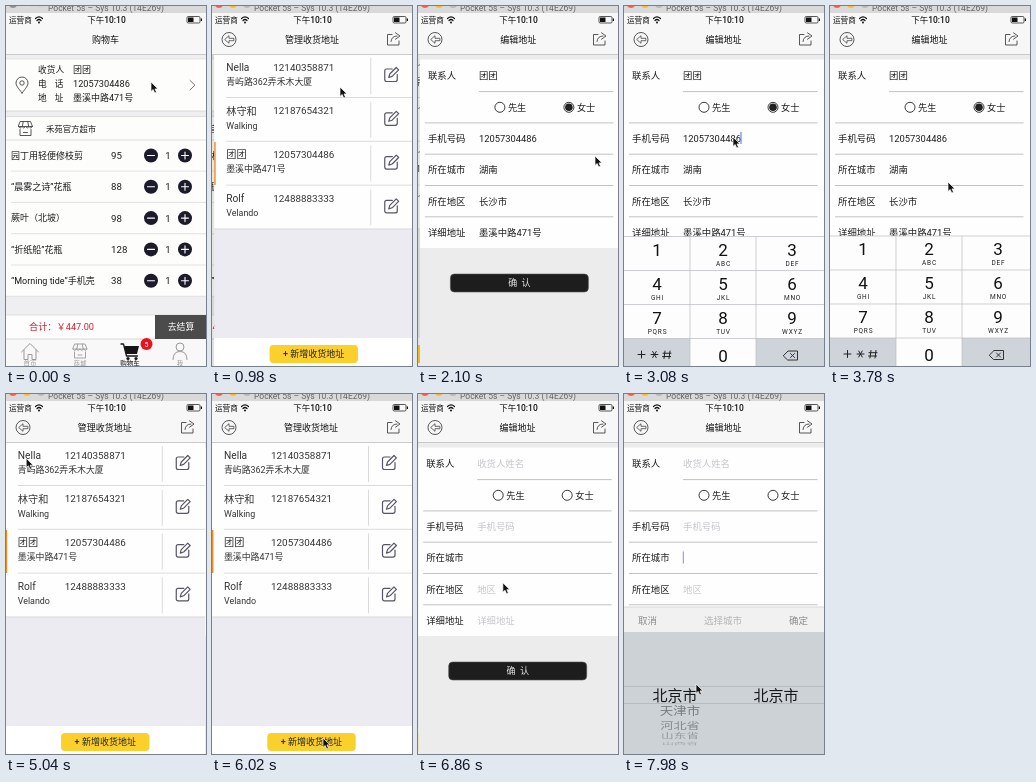
Write an HTML page that moves like this. It is 200 by 360 pixels and loops after 8000 ms.

```html
<!DOCTYPE html>
<html lang="zh-CN">
<head>
<meta charset="utf-8">
<title>地址管理</title>
<style>
  html, body { margin: 0; width: 100%; height: 100%; overflow: hidden; background: #efeff4; }
  svg { display: block; width: 200px; height: 360px; }
  text { font-family: Roboto, "Noto Sans CJK SC", "Noto Sans CJK", sans-serif; white-space: pre; }
</style>
</head>
<body>
<svg id="stage" viewBox="0 0 200 360" xmlns="http://www.w3.org/2000/svg"></svg>
<script>
const LOOP = 8000, STEP = 140;

// Drawing helpers; text is placed by its vertical centre
const text = (s, x, cy, size = 9, fill = '#1c1c1c', more = '') =>
  `<text x="${x}" y="${cy + size * 0.37}" font-size="${size}" fill="${fill}" ${more}>${s}</text>`;
const mid = (s, x, cy, size, fill, more = '') =>
  text(s, x, cy, size, fill, 'text-anchor="middle" ' + more);
const rect = (x, y, w, h, fill, more = '') =>
  `<rect x="${x}" y="${y}" width="${w}" height="${h}" fill="${fill}" ${more}/>`;
const line = (x1, y1, x2, y2, color = '#c4c4c6', w = 0.7) =>
  `<path d="M${x1} ${y1}L${x2} ${y2}" stroke="${color}" stroke-width="${w}"/>`;
const stroke = (d, color = '#444', w = 0.9, more = '') =>
  `<path d="${d}" fill="none" stroke="${color}" stroke-width="${w}" stroke-linecap="round" stroke-linejoin="round" ${more}/>`;
const disc = (x, y, r, fill, more = '') => `<circle cx="${x}" cy="${y}" r="${r}" fill="${fill}" ${more}/>`;
const group = (id, body, more = '') => `<g id="${id}" ${more}>${body}</g>`;
const dim = id => rect(-1, 49, 262, 311, '#000', `id="${id}" opacity="0"`);

const me = { name: '团团', phone: '12057304486', road: '墨溪中路471号' };

// Shop front with a scalloped awning, centred on x
const shop = (x, y, color) => stroke(
  `M${x - 5} ${y}h10l2 5q-1.7 3-3.5 0q-1.7 3-3.5 0q-1.7 3-3.5 0q-1.7 3-3.5 0z` +
  `M${x - 7} ${y + 5}h14M${x - 2.2} ${y}l-1 5M${x + 2.2} ${y}l1 5` +
  `M${x - 5.5} ${y + 8}v6h11v-6M${x - 2} ${y + 11}h4`, color, 0.9);

function cartPage() {
  const goods = [
    ['园丁用轻便修枝剪', 95], ['“晨雾之诗”花瓶', 88], ['蕨叶（北坡）', 98],
    ['“折纸船”花瓶', 128], ['“Morning tide”手机壳', 38]
  ];
  const rows = goods.map(([name, price], i) => {
    const y = 149.5 + i * 31.3;
    return text(name, 5, y) + text(price, 105, y, 9.7) +
      disc(145, y, 7, '#1b1b2b') + stroke(`M141.5 ${y}h7`, '#fff', 1.1) +
      mid(1, 162, y, 9.5) +
      disc(179, y, 7, '#1b1b2b') + stroke(`M175.5 ${y}h7M179 ${y - 3.5}v7`, '#fff', 1.1) +
      line(i < 4 ? 5 : 0, y + 15.6, 200, y + 15.6, '#d6d6d6');
  }).join('');
  const tabs = ['首页', '商城', '购物车', '我']
    .map((s, i) => mid(s, 24 + i * 50, 357.5, 6.5, i === 2 ? '#111' : '#999', i === 2 ? bold : '')).join('');
  return rect(0, 49, 200, 311, '#efeff1') +
    rect(0, 53, 200, 52, '#fdfdfc') + line(0, 53, 200, 53, '#ddd') + line(0, 105, 200, 105, '#ccc') +
    stroke('M16 87C12 82 10 79.5 10 77a6 6 0 0 1 12 0C22 79.500 20 82 16 87z') +
    disc(16, 77, 2.2, 'none', 'stroke="#444" stroke-width=".9"') +
    text('收货人', 32, 64, 8.7) + text(me.name, 67, 64, 9) +
    text('电话', 32, 78, 8.7, '#1c1c1c', 'letter-spacing="8"') + text(me.phone, 67, 78, 9.2) +
    text('地址', 32, 92, 8.7, '#1c1c1c', 'letter-spacing="8"') + text(me.road, 67, 92, 9) +
    stroke('M184 74.5l5 4.7l-5 4.7', '#777', 1) +
    rect(0, 110.5, 200, 180, '#fdfdfc') + line(0, 110.5, 200, 110.5, '#d4d4d4') + line(0, 134, 200, 134, '#d0d0d0') +
    shop(19.5, 115.5, '#444') + text('禾苑官方超市', 40, 122.5, 8.4) + rows +
    rect(0, 309, 200, 24, '#fdfdfd') + line(0, 309, 200, 309, '#d5d5d5') +
    text('合计：￥447.00', 23, 321, 9.2, '#dc1f2e') +
    rect(149, 309, 51, 24, '#4b4b4c') + mid('去结算', 175, 321, 8.8, '#fff') +
    rect(0, 333, 200, 27, '#f8f8f8') + line(0, 333, 149, 333, '#c8c8c8') +
    stroke('M15.5 346l8.5-8.5l8.5 8.5M18 344v9.500h4v-5h4v5h4V344', '#999', 1) +
    shop(74, 338, '#999') +
    '<path d="M118 340h15l-2 8h-11z" fill="#151515"/>' +
    stroke('M115 338h2.5l3 12h11', '#151515', 1.3) + disc(122, 352.5, 1.6, '#151515') + disc(130, 352.5, 1.6, '#151515') +
    disc(174, 341, 4, 'none', 'stroke="#999"') + stroke('M167 353.5q0-8 7-8t7 8', '#999', 1) +
    tabs + disc(140.5, 338, 6, '#e8131f') + mid(5, 140.5, 338, 7, '#fff') + dim('cartDim');
}

function listPage() {
  const people = [
    ['Nella', '12140358871', '青屿路362弄禾木大厦'], ['林守和', '12187654321', 'Walking'],
    [me.name, me.phone, me.road], ['Rolf', '12488883333', 'Velando']
  ];
  const rows = people.map(([name, phone, road], i) => {
    const y = 48 + i * 43.8;
    return text(name, 12, y + 13, 10.2, '#333') + text(phone, 59, y + 13, 9.9, '#333') +
      text(road, 12, y + 27.5, 8.9, '#333') +
      line(156.5, y + 4, 156.5, y + 40, '#ccc') + line(i < 3 ? 12 : 0, y + 43.5, 200, y + 43.5, '#cdcdcf') +
      stroke('M178 -6h-5.5q-2 0-2 2v8.5q0 2 2 2h8.500q2 0 2-2v-5M174.5 2.500l1-3.500l6.500-6.500l2.400 2.400l-6.500 6.500z',
        '#555566', 1.2, `transform="translate(0 ${y + 21})"`);
  }).join('');
  return rect(0, 49, 200, 311, '#ebebf1') + rect(0, 49, 200, 174, '#fefefe') + rows +
    rect(0, 136, 1.4, 43, '#ee8a20') +
    rect(0, 332, 200, 28, '#fff') + rect(55.3, 339, 88.4, 18, '#fcd02c', 'rx="4"') +
    mid('+ 新增收货地址', 99.5, 348, 9, '#222', bold) + dim('listDim');
}

const labels = ['联系人', '', '手机号码', '所在城市', '所在地区', '详细地址'];
const rowY = i => 70 + i * 31.3;
const radio = (x, s, on) =>
  disc(x, rowY(1), 5, '#fff', 'stroke="#222" stroke-width=".9"') +
  (on ? disc(x, rowY(1), 3.8, '#222') : '') + text(s, x + 8, rowY(1), 9.2);

function formPage(values, filled) {
  const rows = labels.map((s, i) =>
    text(s, 8, rowY(i), 9.4) + text(values[i], 59, rowY(i), 9.4, filled ? '#1c1c1c' : '#c6c6cc') +
    (i < 5 ? line(i ? 5 : 59, rowY(i) + 15.6, 193.5, rowY(i) + 15.6, '#aaa') : '')).join('');
  return rect(0, 49, 200, 311, '#ececec') + rect(0, 53.5, 200, 188.5, '#fefefe') + rows +
    radio(80, '先生', false) + radio(149, '女士', filled) +
    rect(30.5, 268, 138, 18, '#1d1d1d', 'rx="4" stroke="#555" stroke-width=".6"') +
    mid('确  认', 99.5, 277, 9, '#e4e4e4');
}

function keyboard() {
  const letters = ['', 'ABC', 'DEF', 'GHI', 'JKL', 'MNO', 'PQRS', 'TUV', 'WXYZ'];
  const keys = letters.map((s, i) => {
    const x = [33, 99, 168][i % 3], y = 243 + Math.floor(i / 3) * 34;
    return mid(i + 1, x, y, 17, '#111') + mid(s, x + 0.5, y + 14, 6.5, '#222', 'letter-spacing=".8"');
  }).join('');
  return rect(0, 230, 200, 131, '#fdfdfd') + rect(0, 332, 66, 29, '#cfd4da') + rect(132, 332, 68, 29, '#cfd4da') +
    [230, 264, 298, 332].map(y => line(0, y, 200, y, '#b9bcc0')).join('') +
    [66, 132].map(x => line(x, 230, x, 361, '#b9bcc0')).join('') + keys + mid('0', 99, 349, 17, '#111') +
    stroke('M14 348h7M17.5 344.5v7M27 348h7M28.7 345l3.5 6M32.2 345l-3.5 6M41 344.5l-1 7.5M46 344.5l-1 7.5M39 346.7h8M38.6 350h8', '#222', 1) +
    stroke('M159.5 349l4.5-4.5h9.5v9h-9.5zM166.5 347l4 4M170.5 347l-4 4', '#333', 1);
}

function picker() {
  // label, centre, size, vertical squeeze, colour
  const wheel = [
    ['北京市', 301, 15, 1, '#16181a'], ['天津市', 317, 13.5, 0.85, '#787c81'], ['河北省', 331, 13.2, 0.72, '#85898e'],
    ['山东省', 342, 12.7, 0.5, '#92969b'], ['山西省', 350, 12, 0.25, '#a2a6ab']
  ];
  const items = wheel.map(([s, y, size, k, color], i) =>
    `<g transform="translate(0 ${y}) scale(1 ${k})">${mid(s, i ? 56 : 51, 0, size, color)}</g>`).join('');
  return rect(0, 213, 200, 25, '#f1f1f1') + line(0, 213, 200, 213, '#ccc') +
    text('取消', 14, 226, 9.5, '#8d8d8d') + mid('选择城市', 99, 226, 9.5, '#b4b4b4') + text('确定', 165, 226, 9.5, '#8d8d8d') +
    rect(0, 238, 200, 123, '#cdd2d7') + items + mid('北京市', 152, 301, 15, '#16181a') +
    line(0, 292.5, 200, 292.5, '#aeb3b8') + line(0, 309.5, 200, 309.5, '#aeb3b8');
}

function chrome() {
  const lights = ['#f25f57', '#f5bd3e', '#b9b9b9'].map((c, i) => disc(7 + i * 14, -2, 4, c)).join('');
  return rect(0, 0, 200, 7, '#d9d9d9') + group('lights', lights) +
    text('Pocket 5s – Sys 10.3 (14E269)', 42, 1.5, 8.5, '#666') +
    rect(0, 7, 200, 42, '#f7f7f7') + line(0, 48.5, 200, 48.5, '#b8b8b8') +
    text('运营商', 3, 14, 7.6, '#111') +
    stroke('M29.5 12.5q3.5-3.2 7 0M31 14.5q2-2 4 0', '#111', 1.2) + disc(33, 16.5, 1, '#111') +
    mid('下午10:10', 100.5, 14, 8.5, '#111', bold) +
    rect(181, 10.5, 13, 6.5, 'none', 'rx="1.2" stroke="#111" stroke-width=".7"') +
    rect(182, 11.5, 5.5, 4.5, '#111') + rect(194.8, 12.5, 1.2, 2.5, '#111');
}

const bold = 'font-weight="500"';
const icons =
  disc(17, 33.5, 7, 'none', 'stroke="#444" stroke-width=".9"') +
  stroke('M21.5 32.3h-4.5v-2.6l-4.300 3.800l4.300 3.800v-2.600h4.500z', '#444', 0.8) +
  stroke('M180 28.5h-4.5v10.5h11.500v-4M179 35.5q.5-5.500 6-5.500M183.5 26.800l4.500 3.200l-4.500 3.200');

document.getElementById('stage').innerHTML =
  group('cart', cartPage()) + group('list', listPage()) +
  group('edit', formPage([me.name, '', me.phone, '湖南', '长沙市', me.road], true)) +
  group('add', formPage(['收货人姓名', '', '手机号码', '', '地区', '详细地址'], false)) +
  group('phoneCaret', rect(116.5, 126, 1, 12, '#4a6ee0')) + group('cityCaret', rect(58.8, 157.5, 1, 12, '#7f93d8')) +
  group('keys', keyboard()) + group('wheel', picker()) + chrome() +
  group('cartTitle', mid('购物车', 99.5, 33.5, 9, '#111', bold)) +
  group('listTitle', mid('管理收货地址', 99, 33.5, 9, '#111', bold)) +
  group('formTitle', mid('编辑地址', 99.5, 33.5, 9, '#111', bold)) +
  group('icons', icons) + group('dots', text('...', -1, 34, 9, '#555')) +
  group('pointer', '<path d="M0 0V9.5L2.2 7.5L3.7 11L5.5 10.2L4 6.9H7Z" fill="#111" stroke="#fff" stroke-width=".7"/>');

const el = {};
document.querySelectorAll('[id]').forEach(n => el[n.id] = n);

const pointerPath = [
  [0, 145, 76], [420, 145, 77], [980, 128, 81], [1500, 177, 150], [2240, 177, 150], [2660, 109, 131],
  [3220, 109, 131], [3640, 120, 178], [3920, 116, 174], [4480, 13, 42], [4900, 13, 42],
  [5740, 110, 343], [6020, 111, 344], [6440, 111, 344], [7000, 80, 160], [7420, 80, 161], [7980, 72, 290]
];

const clamp = v => Math.max(0, Math.min(1, v));
const smooth = v => v * v * (3 - 2 * v);

// Critically damped slide used by page changes
function spring(t, start) {
  const w = Math.max(0, t - start) * 0.01826;
  return 1 - (1 + w) * Math.exp(-w);
}

function pointerAt(t) {
  let i = 0;
  while (i < pointerPath.length - 2 && t >= pointerPath[i + 1][0]) i++;
  const [t0, x0, y0] = pointerPath[i], [t1, x1, y1] = pointerPath[i + 1];
  const k = smooth(clamp((t - t0) / (t1 - t0)));
  return [x0 + (x1 - x0) * k, y0 + (y1 - y0) * k];
}

const move = (n, x, y = 0) => n.setAttribute('transform', `translate(${x.toFixed(2)} ${y.toFixed(2)})`);
const fade = (n, v) => n.setAttribute('opacity', clamp(v).toFixed(3));
const show = (n, on) => n.setAttribute('visibility', on ? 'visible' : 'hidden');

function draw(t) {
  const toList = spring(t, 624);
  const toForm = t < 4620 ? spring(t, 1733) : t < 6300 ? 1 - spring(t, 4620) : spring(t, 6350);
  const adding = t >= 6300;

  move(el.cart, -60 * toList);
  fade(el.cartDim, 0.1 * toList);
  show(el.cart, toList < 0.999);
  move(el.list, 200 * (1 - toList) - 60 * toForm);
  fade(el.listDim, 0.1 * toForm);
  move(el.edit, adding ? 200 : 200 * (1 - toForm));
  move(el.add, adding ? 200 * (1 - toForm) : 200);

  // The window is inactive until the first click
  el.lights.setAttribute('style', t < 560 ? 'filter: grayscale(1) brightness(1.15)' : '');

  move(el.cartTitle, -80 * toList);
  fade(el.cartTitle, 1 - toList * 1.3);
  move(el.listTitle, 80 * (1 - toList) - 80 * toForm);
  fade(el.listTitle, toList * (1 - toForm * 1.3));
  move(el.formTitle, 80 * (1 - toForm));
  fade(el.formTitle, toForm);
  fade(el.icons, toList);
  show(el.dots, t >= 4620 && t < 4900);

  const keysUp = spring(t, 2660) - spring(t, 3780);
  const wheelUp = spring(t, 7240);
  move(el.keys, 0, 131 * (1 - keysUp));
  show(el.keys, keysUp > 0.001);
  move(el.wheel, 0, 148 * (1 - wheelUp));
  show(el.wheel, wheelUp > 0.001);
  show(el.phoneCaret, t >= 2660 && t < 3780);
  show(el.cityCaret, t >= 7240);
  move(el.pointer, ...pointerAt(t));
}

const begin = performance.now();
function tick() {
  const t = (performance.now() - begin) % LOOP;
  draw(Math.floor(t / STEP) * STEP);
  requestAnimationFrame(tick);
}
tick();
</script>
</body>
</html>
```
